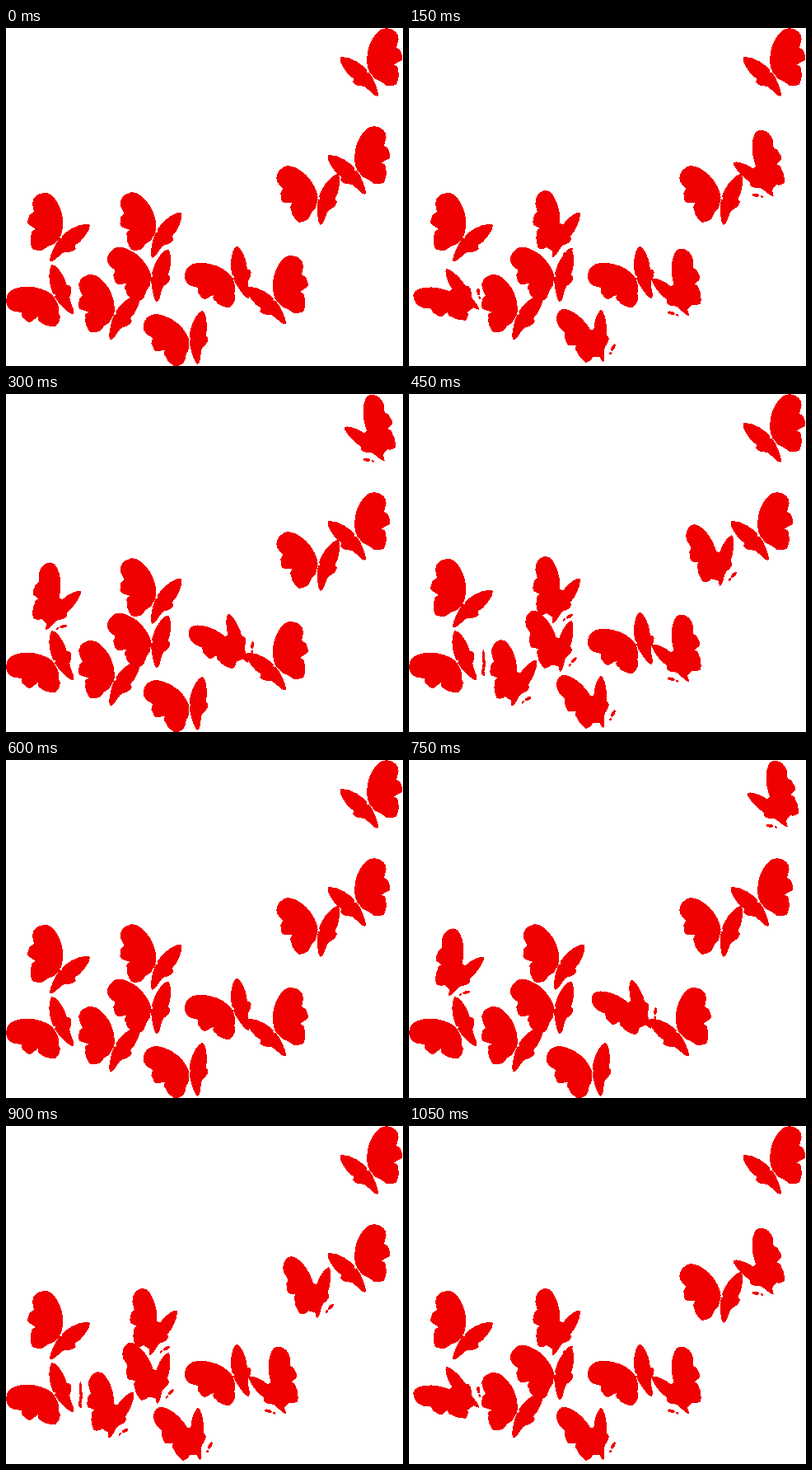
Recreate the animation shown at these times as an HTML page. Size 482 px wide and 410 px high, loop 1200 ms.

```html
<!DOCTYPE html>
<html lang="en">
<head>
<meta charset="utf-8">
<title>Butterflies</title>
<style>
  html, body { margin: 0; width: 100%; height: 100%; overflow: hidden; background: #fff; }
  svg { display: block; width: 100vw; height: 100vh; fill: #f00000; }
</style>
</head>
<body>
<svg id="stage" viewBox="0 0 482 410" shape-rendering="crispEdges">
  <defs>
    <!-- Origin is the joint where the two wings meet -->
    <g id="wings">
      <path d="M0 0C4 -9 4 -22 1 -32C-3 -43 -9 -54 -19 -54C-28 -54 -34 -48 -34 -41
        C-34 -37 -32 -34 -32 -31C-34 -29 -38 -29 -38 -25L-40 -20C-41 -14 -34 -14 -30 -10
        C-34 -9 -36 -7 -35 -4C-38 0 -36 10 -34 14C-29 16 -22 18 -18 13C-15 10 -11 10 -8 8Z"/>
      <path d="M0 0C8 -9 24 -18 35 -16C38 -12 30 -1 25 4C23 7 19 8 18 10C21 16 14 17 10 18
        C3 17 1 21 -3 24C-6 27 -10 30 -12.5 29C-14 25 -10 18 -8 13C-6 8 -3 4 0 0Z"/>
    </g>
    <g id="open">
      <use href="#wings"/>
      <circle cx="1" cy="-.5" r="1.5" fill="#fff"/>
    </g>
    <!-- Folding squeezes the wings across the body axis and closes the gap between them -->
    <g id="folded">
      <use href="#wings" transform="rotate(20) scale(.75 1.02) rotate(-20)"/>
      <path d="M2 -10L-20 15L-11 23L5 8L8 -6Z"/>
      <ellipse cx="9" cy="25" rx="4.5" ry="1.9" transform="rotate(-18 9 25)"/>
      <ellipse cx="2" cy="28" rx="2" ry="1.3" transform="rotate(-30 2 28)"/>
    </g>
  </defs>
</svg>
<script>
const STEP = 150;
// Groups folded during each step of the loop
const FOLDS = ["", "ab", "c", "ad", "", "c", "ad", "ab"];

// Poses are [x, y, angle]
const butterflies = [
  { group: "c", open: [440.5, 53, -3], folded: [442.5, 53.5, 10], mirror: true },
  { group: "b", open: [425.5, 172, -3], folded: [425.5, 176.5, 10], mirror: true },
  { group: "a", open: [327, 330, 0], folded: [325, 320, 5], mirror: true },
  { group: "d", open: [379, 207.5, -28], folded: [375, 201, -27] },
  { group: "c", open: [66, 254, 0], folded: [61.5, 256.5, 2] },
  { group: "a", open: [182, 247.5, -14], folded: [182, 246.5, -9] },
  { group: "d", open: [176.5, 301.5, -35], folded: [180.5, 305, -28] },
  { group: "d", open: [131.5, 347, -14], folded: [130.5, 347, -12] },
  { group: "b", open: [58.5, 325.5, -70], folded: [58, 324, -79] },
  { group: "c", open: [275.5, 303, -60], folded: [273, 301, -62] },
  { group: "a", open: [222.5, 378, -42], folded: [224.5, 375, -42] }
];

const stage = document.getElementById("stage");

function add(tag, attributes) {
  const node = document.createElementNS("http://www.w3.org/2000/svg", tag);
  for (const name in attributes) node.setAttribute(name, attributes[name]);
  return stage.appendChild(node);
}

for (const butterfly of butterflies) butterfly.node = add("use", {});
const sliver = add("path", {
  d: "M90 309C93 313 91 319 93 325C94 331 90 333 92 342C88 343 87 338 89 332C91 326 87 318 90 309Z"
});

function draw(time) {
  const folds = FOLDS[Math.floor(time / STEP) % FOLDS.length];
  for (const { group, node, mirror, ...poses } of butterflies) {
    const state = folds.includes(group) ? "folded" : "open";
    const [x, y, angle] = poses[state];
    node.setAttribute("href", "#" + state);
    node.setAttribute("transform",
      `translate(${x} ${y}) scale(${mirror ? -1 : 1} 1) rotate(${angle})`);
  }
  sliver.setAttribute("visibility", folds.includes("d") ? "visible" : "hidden");
}

const start = performance.now();
function tick() {
  draw(performance.now() - start);
  requestAnimationFrame(tick);
}
tick();
</script>
</body>
</html>
```
